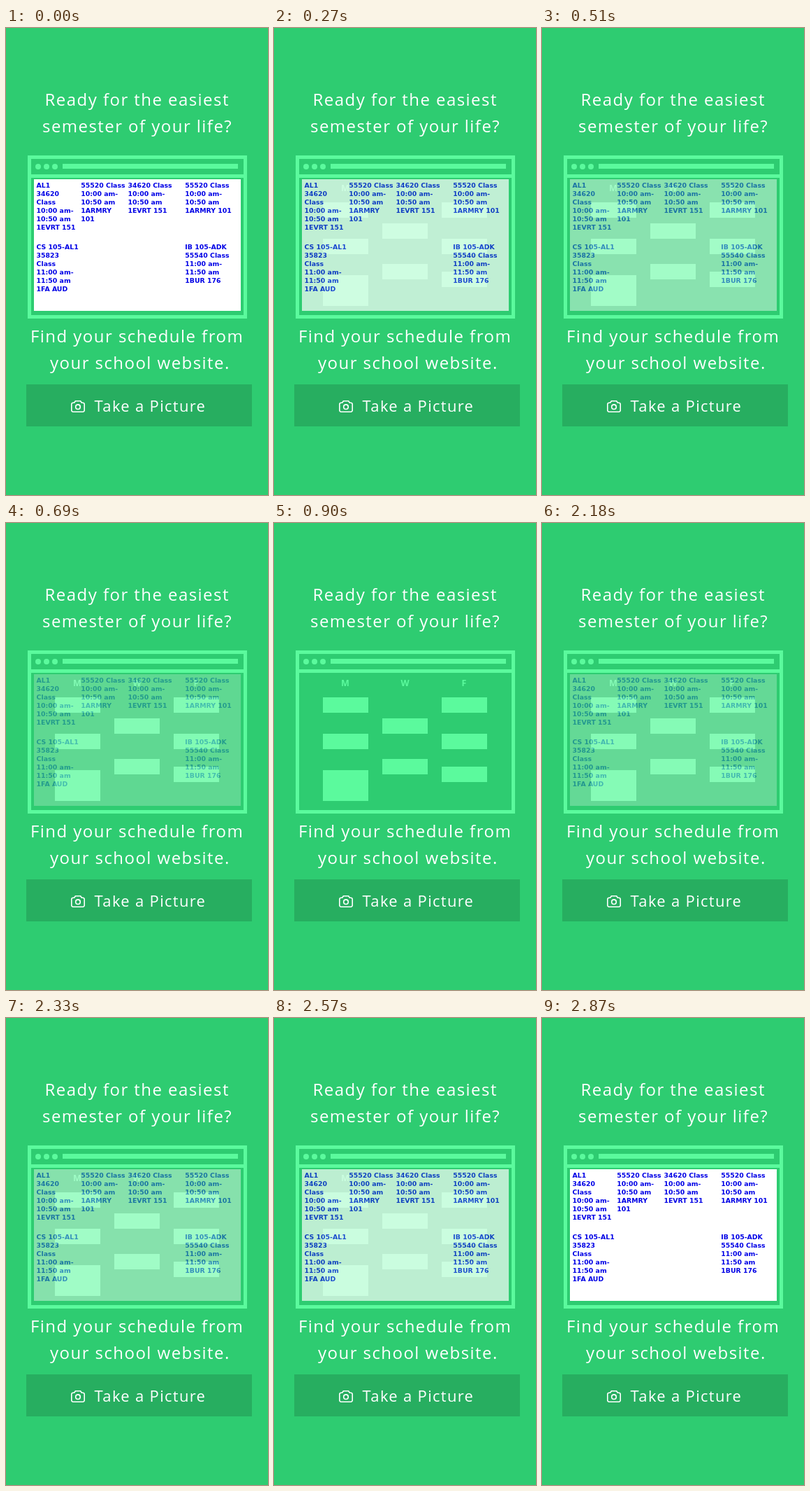
An HTML page that plays this animation: 375 by 667 pixels, repeating every 2900 ms.

```html
<!DOCTYPE html>
<html lang="en">
<head>
<meta charset="utf-8">
<title>Schedule capture</title>
<style>
  html, body { margin: 0; width: 100%; height: 100%; overflow: hidden; background: #2ecc71; }
  svg { display: block; }
  text { white-space: pre; }
  .copy { font: 24px "Open Sans", "Noto Sans", sans-serif; letter-spacing: .06em; fill: #fff; }
  .button { font-size: 22px; }
  .day { font: bold 12.5px "Open Sans", "Noto Sans", sans-serif; text-anchor: middle; }
  .class { font: bold 9.35px "DejaVu Sans", Verdana, sans-serif; fill: #0000e6; }
</style>
</head>
<body>
<svg width="375" height="667" viewBox="0 0 375 667">
  <text class="copy" x="55.6" y="111">Ready for the easiest</text>
  <text class="copy" x="52" y="149">semester of your life?</text>
  <text class="copy" x="35" y="449">Find your schedule from</text>
  <text class="copy" x="63" y="487">your school website.</text>

  <g fill="#5bfa9d">
    <path fill-rule="evenodd" d="M31 182h314v233h-314z M36 187v22h304v-22z M36 214v196h304v-196z"/>
    <circle cx="46" cy="198" r="4"/>
    <circle cx="58" cy="198" r="4"/>
    <circle cx="70" cy="198" r="4"/>
    <rect x="81" y="194" width="251" height="7"/>
    <text class="day" x="102" y="233">M</text>
    <text class="day" x="187.5" y="233">W</text>
    <text class="day" x="272" y="233">F</text>
    <g id="blocks"></g>
  </g>

  <g id="sheet">
    <rect x="40" y="216" width="296" height="188" fill="#fff"/>
  </g>

  <rect x="29" y="509" width="323" height="60" fill="#27ae60"/>
  <g fill="none" stroke="#fff" stroke-width="1.6" stroke-linejoin="round">
    <path d="M96 535.2h1.6l1.8-2.5h7.2l1.8 2.5h1.6a2.2 2.2 0 0 1 2.2 2.2v8.6a2.2 2.2 0 0 1-2.2 2.2h-14a2.2 2.2 0 0 1-2.2-2.2v-8.6a2.2 2.2 0 0 1 2.2-2.2z"/>
    <circle cx="103" cy="541.2" r="3.3"/>
  </g>
  <text class="copy button" x="126.6" y="548">Take a Picture</text>
</svg>
<script>
const sheet = document.getElementById("sheet");
const blocks = document.getElementById("blocks");

function add(parent, tag, attrs, text = "") {
  const el = document.createElementNS("http://www.w3.org/2000/svg", tag);
  for (const key in attrs) el.setAttribute(key, attrs[key]);
  el.textContent = text;
  parent.append(el);
}

// x, y, height
[
  [70, 249, 22], [70, 301, 22], [70, 353, 44],
  [155, 279, 22], [155, 337, 22],
  [240, 249, 22], [240, 301, 22], [240, 348, 22]
].forEach(([x, y, height]) => add(blocks, "rect", { x, y, width: 65, height }));

// x, first baseline, lines
[
  [43.6, 228, "AL1|34620|Class|10:00 am-|10:50 am|1EVRT 151"],
  [107.3, 228, "55520 Class|10:00 am-|10:50 am|1ARMRY|101"],
  [174.4, 228, "34620 Class|10:00 am-|10:50 am|1EVRT 151"],
  [256.3, 228, "55520 Class|10:00 am-|10:50 am|1ARMRY 101"],
  [43.6, 316.4, "CS 105-AL1|35823|Class|11:00 am-|11:50 am|1FA AUD"],
  [256.3, 316.4, "IB 105-ADK|55540 Class|11:00 am-|11:50 am|1BUR 176"]
].forEach(([x, y, lines]) => lines.split("|").forEach((line, i) =>
  add(sheet, "text", { class: "class", x, y: y + 12 * i }, line)));

const LOOP = 2900, STEP = 30, FADED = 900, RETURN = 1970;

// Linear fade out, hold, linear fade in, in steps of 30 ms
function opacityAt(t) {
  if (t < FADED) return 1 - Math.floor(t / STEP) * STEP / FADED;
  if (t < RETURN) return 0;
  return Math.min(1, (Math.floor((t - RETURN) / STEP) + 1) / 31);
}

const start = performance.now();
function draw() {
  sheet.setAttribute("opacity", opacityAt((performance.now() - start) % LOOP));
  requestAnimationFrame(draw);
}
draw();
</script>
</body>
</html>
```
